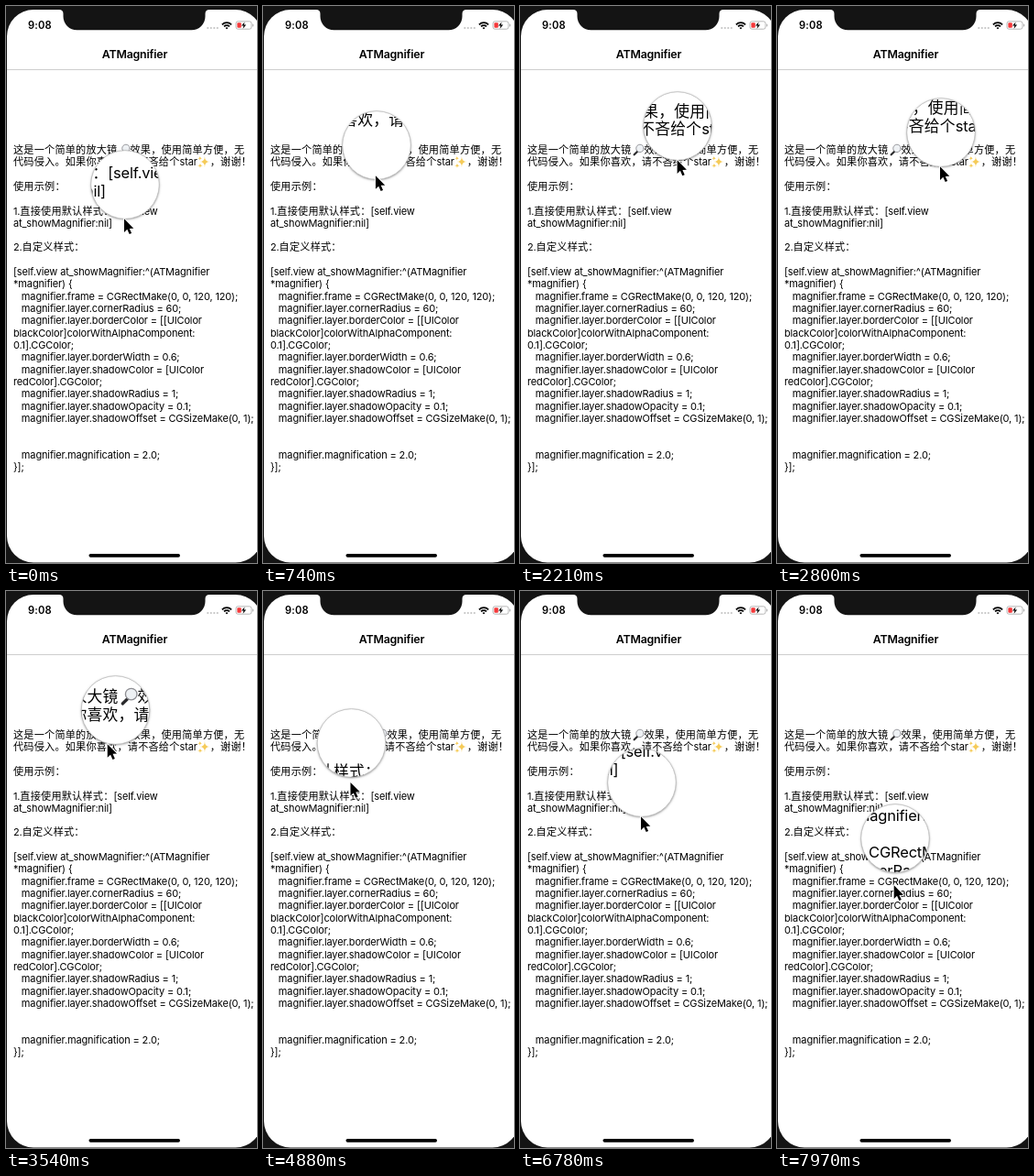
These frames come from a looping animation (274 px wide and 608 px high, 8000 ms). An HTML page with a canvas:

```html
<!DOCTYPE html>
<html lang="zh-CN">
<head>
<meta charset="utf-8">
<title>ATMagnifier</title>
<style>
html, body { margin: 0; width: 100%; height: 100%; overflow: hidden; background: #141414; }
canvas { display: block; width: 274px; height: 608px; }
</style>
</head>
<body>
<canvas id="stage"></canvas>
<script>
const W = 274, H = 608, LOOP = 8000, STEP = 147.5;
const LENS_R = 37.3, ZOOM = 1.5;
const BEZEL = "#141414";
const LATIN = "Inter, Roboto, sans-serif";
const CJK = "'Noto Sans CJK SC', 'Noto Sans CJK', sans-serif";

const canvas = document.getElementById("stage");
const ctx = canvas.getContext("2d");
const dpr = window.devicePixelRatio || 1;
canvas.width = W * dpr;
canvas.height = H * dpr;

const lines = `这是一个简单的放大镜🔎效果，使用简单方便，无
代码侵入。如果你喜欢，请不吝给个star✨，谢谢！

使用示例：

1.直接使用默认样式：[self.view
at_showMagnifier:nil]

2.自定义样式：

[self.view at_showMagnifier:^(ATMagnifier
*magnifier) {
   magnifier.frame = CGRectMake(0, 0, 120, 120);
   magnifier.layer.cornerRadius = 60;
   magnifier.layer.borderColor = [[UIColor
blackColor]colorWithAlphaComponent:
0.1].CGColor;
   magnifier.layer.borderWidth = 0.6;
   magnifier.layer.shadowColor = [UIColor
redColor].CGColor;
   magnifier.layer.shadowRadius = 1;
   magnifier.layer.shadowOpacity = 0.1;
   magnifier.layer.shadowOffset = CGSizeMake(0, 1);


   magnifier.magnification = 2.0;
}];`.split("\n");

// Drag path of the lens centre: step, x, y
const path = [
  [0, 130, 195], [1, 130, 195], [5, 124, 152], [9, 142, 125], [10, 151, 125],
  [15, 172, 131], [18, 179, 138], [20, 179, 138], [24, 119.5, 130],
  [28, 99, 128], [30, 98, 128], [33, 96.5, 166], [38, 110, 198],
  [44, 133, 209], [46, 133, 209], [53, 132, 250], [54, 129, 270]
];

function lensAt(n) {
  const i = Math.max(1, path.findIndex(p => p[0] >= n));
  const [n0, x0, y0] = path[i - 1], [n1, x1, y1] = path[i];
  const k = (n - n0) / (n1 - n0);
  return [x0 + (x1 - x0) * k, y0 + (y1 - y0) * k];
}

// The pointer runs ahead of the lens in fast drags
const lead = v => 0.035 * v * Math.abs(v);

function setType(font, spacing) {
  ctx.font = font;
  ctx.letterSpacing = spacing + "px";
}

function disc(x, y, r) {
  ctx.beginPath();
  ctx.arc(x, y, r, 0, Math.PI * 2);
}

function fillRound(color, x, y, w, h, r) {
  ctx.fillStyle = color;
  ctx.beginPath();
  ctx.roundRect(x, y, w, h, r);
  ctx.fill();
}

function drawLoupe(x, y) {
  ctx.lineCap = "round";
  ctx.strokeStyle = "#2b2b2d";
  ctx.lineWidth = 2.2;
  ctx.beginPath();
  ctx.moveTo(x + 7.3, y - 2.7);
  ctx.lineTo(x + 3.2, y + 1.3);
  ctx.stroke();
  disc(x + 9.5, y - 5.6, 4.2);
  ctx.fillStyle = "#eef1f4";
  ctx.fill();
  ctx.strokeStyle = "#8d8d92";
  ctx.lineWidth = 0.9;
  ctx.stroke();
}

function sparkle(x, y, r) {
  ctx.beginPath();
  ctx.moveTo(x, y - r);
  for (let i = 0; i < 4; i++) {
    const a = i * Math.PI / 2;
    ctx.quadraticCurveTo(x, y, x + r * Math.cos(a), y + r * Math.sin(a));
  }
  ctx.fill();
}

function drawSparkles(x, y) {
  ctx.fillStyle = "#f5cb58";
  sparkle(x + 8.2, y - 4.2, 5.8);
  sparkle(x + 3, y - 8, 2.8);
  sparkle(x + 3.2, y, 3);
}

const emoji = { "🔎": drawLoupe, "✨": drawSparkles };

function drawLine(text, x, y) {
  const runs = text.match(/[🔎✨]|[\u3000-\uffef]+|[^\u3000-\uffef🔎✨]+/gu) || [];
  for (const run of runs) {
    if (emoji[run]) {
      emoji[run](x, y);
      x += 14;
      continue;
    }
    if (/[\u3000-\uffef]/.test(run)) setType("11.16px " + CJK, 0.19);
    else setType("11px " + LATIN, -0.14);
    ctx.fillStyle = "#000";
    ctx.fillText(run, x, y);
    x += ctx.measureText(run).width;
  }
}

function drawBody() {
  lines.forEach((line, i) => drawLine(line, 8, 161 + i * 13.31));
}

function drawStatus() {
  ctx.fillStyle = "#000";
  setType("600 11.2px " + LATIN, 0.1);
  ctx.fillText("9:08", 24, 25);

  ctx.fillStyle = "#c4c4c4";
  for (let i = 0; i < 4; i++) {
    disc(220.3 + i * 3.5, 24, 1.1);
    ctx.fill();
  }

  ctx.strokeStyle = "#000";
  ctx.lineCap = "butt";
  ctx.lineWidth = 1.8;
  for (let r = 1.2; r < 8; r += 3) {
    ctx.beginPath();
    ctx.arc(241, 25.4, r, -Math.PI * 0.75, -Math.PI * 0.25);
    ctx.stroke();
  }

  ctx.strokeStyle = "#a5a5a5";
  ctx.lineWidth = 0.8;
  ctx.beginPath();
  ctx.roundRect(251, 16.8, 17, 8.4, 2.2);
  ctx.stroke();
  fillRound("#a5a5a5", 269.2, 19.6, 1, 2.8, 0.4);
  fillRound("#f5383a", 252.4, 18.2, 4.4, 5.6, 1);
  ctx.fillStyle = "#000";
  ctx.fill(new Path2D("M260.6 17.4 257 21.6H259.4L258.6 24.8 262.2 20.4H259.8Z"));
}

function drawNotch() {
  ctx.fillStyle = BEZEL;
  ctx.beginPath();
  ctx.moveTo(58, 3);
  ctx.lineTo(58, 4);
  ctx.quadraticCurveTo(62.5, 4, 62.5, 8.5);
  ctx.arcTo(62.5, 26.3, 78, 26.3, 15);
  ctx.arcTo(217.5, 26.3, 217.5, 10, 15);
  ctx.lineTo(217.5, 8.5);
  ctx.quadraticCurveTo(217.5, 4, 222, 4);
  ctx.lineTo(222, 3);
  ctx.fill();
}

function drawPhone() {
  ctx.fillStyle = BEZEL;
  ctx.fillRect(0, 0, W, H);
  fillRound("#fff", 1, 4, 278.5, 603.5, 29);
  drawNotch();
  drawStatus();

  ctx.fillStyle = "#000";
  setType("600 12.4px " + LATIN, -0.2);
  ctx.textAlign = "center";
  ctx.fillText("ATMagnifier", 140.4, 57.3);
  ctx.textAlign = "left";
  ctx.fillStyle = "#c2c2c2";
  ctx.fillRect(1, 69, W, 0.8);

  drawBody();
  fillRound("#000", 90.5, 598, 99.5, 3.7, 1.85);
}

function drawLens(x, y) {
  ctx.save();
  ctx.shadowColor = "rgba(0,0,0,0.5)";
  ctx.shadowBlur = 2.5 * dpr;
  ctx.shadowOffsetY = 0.8 * dpr;
  ctx.fillStyle = "#fff";
  disc(x, y, LENS_R);
  ctx.fill();
  ctx.restore();

  ctx.save();
  disc(x, y, LENS_R);
  ctx.clip();
  ctx.translate(x, y);
  ctx.scale(ZOOM, ZOOM);
  ctx.translate(-x, -y - 37);
  drawBody();
  ctx.restore();

  disc(x, y, LENS_R);
  ctx.strokeStyle = "#bdbdbd";
  ctx.lineWidth = 0.8;
  ctx.stroke();
}

function drawPointer(x, y) {
  const arrow = new Path2D("M.5 .8V15.4L3.8 12.3 6.2 17.6 8.6 16.6 6.3 11.4 10.8 11.2Z");
  ctx.save();
  ctx.translate(x, y);
  ctx.lineJoin = "round";
  ctx.strokeStyle = "#fff";
  ctx.lineWidth = 1.8;
  ctx.stroke(arrow);
  ctx.fillStyle = "#000";
  ctx.fill(arrow);
  ctx.restore();
}

let shown = -1;

function draw(time) {
  const n = Math.floor((time % LOOP + 6) / STEP);
  if (n === shown) return;
  shown = n;
  const [x, y] = lensAt(n);
  const [px, py] = lensAt(Math.max(0, n - 1));
  ctx.setTransform(dpr, 0, 0, dpr, 0, 0);
  drawPhone();
  drawLens(x, y);
  drawPointer(x - 1.5 + lead(x - px), y + 36.5 + lead(y - py));
}

const start = performance.now();

function loop(now) {
  draw(Math.max(0, now - start));
  requestAnimationFrame(loop);
}

draw(0);
requestAnimationFrame(loop);
</script>
</body>
</html>
```
